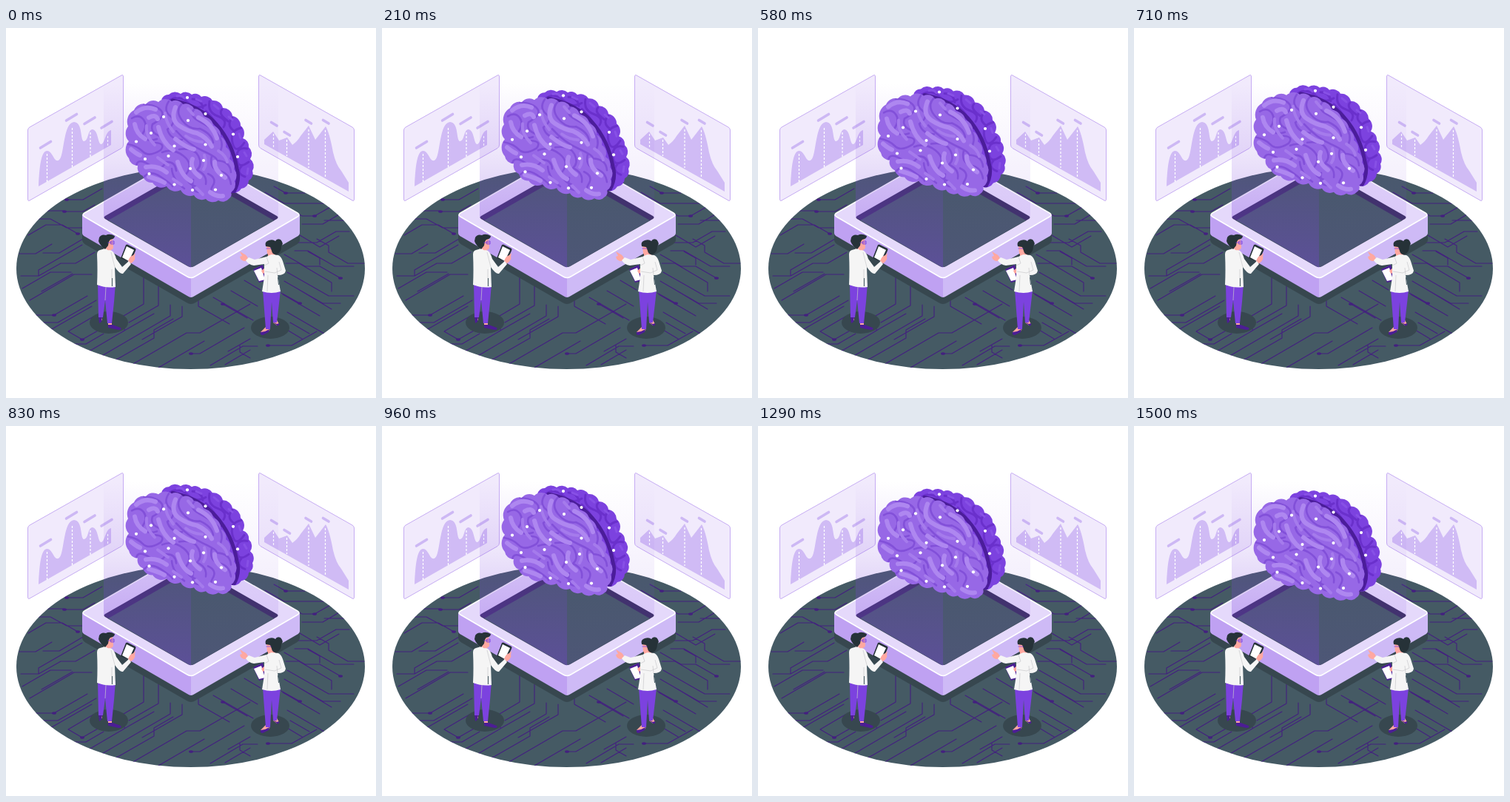
Animation, 500 px wide and 500 px high, one loop 1540 ms. Source, as an HTML page:

```html
<!DOCTYPE html>
<html lang="en">
<head>
<meta charset="utf-8">
<style>
  html, body { margin: 0; width: 100%; height: 100%; overflow: hidden; background: #fff; }
  svg { display: block; width: 100vw; height: 100vh; }
  .line { fill: none; stroke-linecap: round; stroke-linejoin: round; }
  .dash { fill: none; stroke: #fff; stroke-width: 1.2; stroke-dasharray: 3 2; }
  .tick { fill: none; stroke: #cdb8f4; stroke-width: 3.6; stroke-linecap: round; }
  .panel { fill: #f1eafc; stroke: #c6acf3; stroke-width: 1; }
  .chart { fill: #d0bbf5; }
  .skin { fill: #ffa8a0; }
  .hair { fill: #263238; }
  .coat { fill: #f5f5f5; }
  .trousers { fill: #7c42df; }
  .shoe { fill: #4c1d95; }
  .fold { fill: none; stroke: #c9c9cc; stroke-width: .7; }
</style>
</head>
<body>
<svg viewBox="0 0 500 500">
  <defs>
    <linearGradient id="beamLeft" x1="0" x2="0" y1="75" y2="324" gradientUnits="userSpaceOnUse">
      <stop offset="0" stop-color="#7c42df" stop-opacity="0"/>
      <stop offset=".35" stop-color="#7c42df" stop-opacity=".12"/>
      <stop offset="1" stop-color="#7c42df" stop-opacity=".42"/>
    </linearGradient>
    <linearGradient id="beamRight" x1="0" x2="0" y1="75" y2="324" gradientUnits="userSpaceOnUse">
      <stop offset="0" stop-color="#7c42df" stop-opacity="0"/>
      <stop offset="1" stop-color="#7c42df" stop-opacity=".15"/>
    </linearGradient>
    <clipPath id="floorClip"><ellipse cx="249.5" cy="325" rx="235.5" ry="136"/></clipPath>
    <clipPath id="wellClip"><path id="well" d="M134 254L246 190Q250 188 254 190L366 254Q369 256 366 258L254 322Q250 324 246 322L134 258Q131 256 134 254"/></clipPath>
    <clipPath id="frontClip"><path id="frontShape"/></clipPath>
    <clipPath id="backClip"><path id="backShape"/></clipPath>
  </defs>

  <ellipse cx="249.5" cy="325" rx="235.5" ry="136" fill="#455a64"/>
  <g clip-path="url(#floorClip)">
    <path class="line" stroke="#43207f" stroke-width="1.1" d="
      M82 232H104L130 217 M79 248H104L120 239 M50 247H78 M97 278L76 266H54L30 280
      M103 270H82L60 258H40 M104 285L72 304H50 M103 293L44 327V334 M18 305H40L62 292
      M20 335H44L74 318H94L120 303 M22 352L60 330H88 M32 368L92 333H116 M48 356L90 332
      M65 388H34 M65 388L110 362 M44 398H70L122 368 M60 408L116 376 M103 421L84 410L118 390
      M103 421L126 408 M84 427H108L132 413 M112 437L160 409V400 M128 444L222 389V374
      M146 450L200 419V408L226 393 M154 392L186 373V330 M166 398L206 375V346 M158 410L200 386
      M170 455L244 412H262L330 373 M206 459L268 423 M250 440H262L322 405 M260 362V376L302 400
      M293 373L326 392 M238 376V390L184 421 M276 456L320 430H340 M280 364L334 395 M304 355L340 376
      M300 437L330 420 M296 455L330 435 M354 429H386L420 410 M330 446L316 438V428
      M397 372L372 358 M322 341L344 354 M376 342L428 372H452 M390 350L440 380 M374 360L424 389
      M380 384L430 413 M384 398L410 413 M380 408L400 420 M452 338L424 322H404L376 306
      M484 318H462L436 303V294L420 285 M380 290H420L446 275H464 M397 280L424 296L450 281
      M390 301H408L444 322H470 M378 318H396L440 344V356 M380 330L436 362H470
      M417 254H400L388 247 M417 254L440 241 M430 260H474 M400 265H428L450 252
      M378 223L362 214 M378 223H404 M350 222L376 237H430 M370 250L350 238 M408 302L424 311V320"/>
    <g id="nodes" fill="#43207f"></g>
  </g>

  <!-- platform -->
  <path fill="#37474f" d="M103 262L250 180L397 262V286Q397 290 392 293L256 371Q250 375 244 371L108 293Q103 290 103 286Z"/>
  <path fill="#bfa1f2" d="M103 252V277Q103 280 107 282L245 362Q248 364 250 364V334Z"/>
  <path fill="#cebaf6" d="M397 252V277Q397 280 393 282L255 362Q252 364 250 364V334Z"/>
  <path fill="#e5d9fb" stroke="#fff" stroke-width="1.5" d="M106 250L245 170Q250 167 255 170L394 250Q398 252.500 394 255L255 336Q250 339 245 336L106 255Q102 252.500 106 250Z"/>
  <use href="#well" fill="#3b3062"/>
  <g clip-path="url(#wellClip)"><path fill="#455a64" d="M126 267L250 196L374 267L250 338Z"/></g>

  <!-- left panel -->
  <path class="panel" d="M32 134L156 64Q158.500 62.500 158.500 66V158Q158.500 161 156 162.500L32 233Q29.500 234.500 29.500 231V138Q29.500 135.500 32 134"/>
  <path class="chart" d="M44 214C45 190 47 167 55 166S65 184 72 178S77 128 92 127C104 128 100 151 105 153C112 153 110 137 117 137C125 138 124 158 129 157C134 155 134 140 142 138V158Z"/>
  <path class="dash" d="M55.500 170V208M89.500 135V189M114 141V174M137.500 146V161"/>
  <path class="tick" d="M46.500 162L60.500 153.500M81.500 125L95.500 116.500M106 129.500L120 121M129 135L143 126.500"/>

  <!-- right panel -->
  <path class="panel" d="M344 64L468 134Q470.500 135.500 470.500 138V231Q470.500 234.500 468 233L344 162.500Q341.500 161 341.500 158V66Q341.500 62.500 344 64"/>
  <path class="chart" d="M349 151L361 140L369 152L380 148L387 158Q394 153 398 146L409 132L418 151L432 133Q437 141 442 168Q446 185 453 193L463 209V221L349 157Z"/>
  <path class="dash" d="M361.500 143V163M379.500 151V173M409 137V189M431.500 138V201"/>
  <path class="tick" d="M358.500 127.500L366 132M376 140.500L383.500 145M405 124.500L412.500 129M428.500 124.500L436 129"/>

  <path fill="url(#beamLeft)" d="M132 75H250V324L132 256Z"/>
  <path fill="url(#beamRight)" d="M250 75H368V256L250 324Z"/>

  <!-- brain -->
  <g id="brain">
    <use href="#backShape" fill="#7c42df"/>
    <g clip-path="url(#backClip)" class="line">
      <path stroke="#6a30cc" stroke-width="3" d="M222 97Q234 90 246 101T270 104M252 96Q264 96 266 108M275 99Q272 114 286 119T294 134M292 110Q286 116 300 126M306 121Q297 131 308 139M318 135Q302 138 306 155T322 155M326 163Q311 160 312 176T328 181M318 187Q310 196 323 201M306 171Q320 190 310 207M270 112Q285 126 291 143"/>
      <path stroke="#8750e6" stroke-width="3" d="M231 92Q238 90 241 95M257 96L264 99M281 104L287 109M301 120L306 124M315 143L317 149M322 168L325 173M327 190L326 197"/>
      <path stroke="#4b1d9a" stroke-width="5" d="M225 98Q262 105 284 130T312 190Q317 206 307 223"/>
    </g>
    <use href="#frontShape" fill="#9768e6"/>
    <g clip-path="url(#frontClip)" class="line">
      <path stroke="#8250d9" stroke-width="2.600" d="
        M170 122Q180 116 186 124T184 144Q190 155 204 150M186 103Q204 104 210 112T198 130Q194 141 208 146
        M220 99Q212 111 222 119T218 137Q222 151 238 151M238 102Q228 112 238 125T262 136Q278 143 280 155
        M255 109Q246 118 261 126T285 142Q295 153 290 166M165 157Q177 159 185 167T209 165Q216 156 202 155
        M176 186Q178 175 194 185T216 181Q229 180 230 193M185 203Q194 191 209 201T225 214
        M211 168Q226 162 240 173T243 198Q244 210 256 214M234 164Q254 161 260 173T258 192Q272 198 270 211
        M230 139Q246 157 266 166T285 179Q303 180 304 195M278 173Q274 190 288 193T304 211
        M273 197Q286 203 279 214T294 229M224 190Q225 205 241 217M253 205Q249 223 264 222"/>
      <path stroke="#ae87f0" stroke-width="6" d="
        M176 114Q188 104 202 110M174 130Q176 143 188 150M193 121Q202 116 205 123
        M229 107Q222 124 234 132T258 142Q272 148 278 160M229 150Q244 162 254 164
        M206 134Q211 155 226 165M189 188Q204 185 217 195M169 164Q176 170 181 172
        M232 181Q238 201 250 207M252 177Q247 190 262 201M193 201Q207 205 214 209
        M260 121Q279 130 285 149M282 181Q281 192 296 202M276 222Q284 228 293 227"/>
      <path stroke="#a57bec" stroke-width="4" d="M190 132Q188 145 201 158M215 115Q216 128 226 140M246 109L253 117M205 175L219 185M243 146Q252 153 265 154M268 172Q272 184 267 191M226 204L237 212M287 166Q297 172 299 181M257 216L266 225"/>
    </g>
    <g id="dots" fill="#fff"></g>
  </g>

  <!-- man -->
  <ellipse cx="139" cy="398" rx="26" ry="15" fill="#37474f"/>
  <path class="skin" d="M126 388H130L130 395H126ZM138 396H143V402H138Z"/>
  <path class="shoe" d="M125 391L130 391L129 397L126 399ZM138 401L144 401L155 405Q157 408 152 408L138 405Z"/>
  <path class="trousers" d="M124 345H148L146 370L143 399H137L134 368L131 391H125Z"/>
  <path class="fold" stroke="#5b28b4" d="M135 350L134 368"/>
  <path class="hair" d="M164 292.500L175 298Q176 299 175 301L168 317L155 311L162 293Z"/>
  <path fill="#fff" d="M163 295L173 300L166 315L157 310Z"/>
  <path class="skin" d="M165 316Q166 309 172 307L175 304L174 309Q176 313 169 318ZM132 294H142V302L133 304Z"/>
  <path class="coat" d="M127 300L134 298L143 301Q147 304 149 312L157 323L166 315L169 319L158 332Q154 333 147 323L148 350Q136 352 123 347Q124 328 123 306Q123 301 127 300"/>
  <path class="fold" d="M142 303L147 323M143 326V349"/>
  <path stroke="#455a64" stroke-width="1" d="M143.500 338V349"/>
  <path class="skin" d="M133 286L144 285L145 297Q143 301 137 300L132 294Z"/>
  <path class="hair" d="M126 283Q129 278 135 280Q140 277 147 281Q147 285 141 286Q139 287 138 294L134 299Q127 294 125 288Z"/>
  <path class="line" stroke="#7c42df" stroke-width=".9" d="M138 290H145M142 288H146V292H142Z"/>

  <!-- woman -->
  <ellipse cx="357" cy="405" rx="26" ry="15" fill="#37474f"/>
  <path class="skin" d="M352 403H357L356 409L346 413L344 411ZM361 393H365L369 400L366 402L361 398Z"/>
  <path class="shoe" d="M344 411L350 410L356 407L355 411L347 415Q343 415 344 411ZM361 397L366 400L369 399Q370 403 366 402Z"/>
  <path class="trousers" d="M347 354H371L369 372L366 398H361L359 370L357 407H351Z"/>
  <path fill="#4c1d95" d="M334 326L347 320L352 341L342 344Z"/>
  <path fill="#fff" d="M335 328L345 324L350 340L342 342Z"/>
  <path class="skin" d="M316 302L321 305Q326 307 327 312L324 315Q317 315 316 309L319 308ZM345 328L350 324L352 330L347 332ZM354 300H364V309H354Z"/>
  <path class="coat" d="M352 309L358 306L368 307Q372 309 374 315L378 328Q377 334 367 334L371 356Q359 360 346 356L349 337V319L335 321Q328 320 324 314L328 310L336 313Z"/>
  <path class="fold" d="M352 309L355 318L349 321M369 316L372 327L363 331L350 329M367 334L366 324M354 334L353 356"/>
  <path stroke="#455a64" stroke-width="1" d="M367.500 337L368.500 347"/>
  <path class="skin" d="M352 294H363V302Q358 309 353 305Z"/>
  <path class="hair" d="M351 295Q349 289 355 287Q361 285 364 288Q366 284 371 286Q376 291 372 295Q372 303 366 306Q360 307 359 301L357 296Z"/>
  <path class="line" stroke="#7c42df" stroke-width=".8" d="M352 298H358"/>
</svg>
<script>
  const byId = id => document.getElementById(id);

  const ellipses = (points, rx, ry) => points.map(([x, y]) =>
    `<ellipse cx="${x}" cy="${y}" rx="${rx}" ry="${ry}"/>`).join('');

  // Closed outline whose consecutive points are joined by outward bulges.
  const scallop = points => points.map(([x, y], i) => {
    const [nx, ny] = points[(i + 1) % points.length];
    const r = Math.hypot(nx - x, ny - y) * 0.75;
    return `${i ? '' : `M${x} ${y}`}A${r} ${r} 0 0 1 ${nx} ${ny}`;
  }).join('') + 'Z';

  byId('backShape').setAttribute('d', scallop([
    [210, 98], [220, 90], [236, 89], [251, 90], [264, 93], [279, 98], [293, 108], [306, 119],
    [317, 132], [320, 149], [328, 161], [330, 177], [333, 193], [328, 206], [318, 217], [303, 222], [240, 160]
  ]));
  byId('frontShape').setAttribute('d', scallop([
    [166, 153], [165, 133], [173, 111], [189, 103], [206, 100], [224, 99], [239, 103], [254, 109],
    [267, 120], [280, 132], [290, 147], [297, 161], [302, 177], [308, 191], [309, 207], [304, 222],
    [301, 231], [287, 233], [270, 231], [254, 226], [236, 219], [217, 214], [198, 209], [185, 200],
    [178, 186], [166, 176]
  ]));
  byId('dots').innerHTML = ellipses([
    [245, 94], [269.5, 116], [213, 120], [246, 125], [196, 142], [176, 153.5], [227.5, 159.5],
    [269.5, 157.5], [307, 143.5], [313, 174], [188, 177], [219.5, 173], [267, 179], [249, 190],
    [193.5, 197], [291, 199], [227.5, 211.5], [252, 219], [283, 218.5]
  ], 2.1, 2.1);
  byId('nodes').innerHTML = ellipses([
    [82, 232], [79, 248], [97, 278], [65, 388], [103, 421], [250, 440], [293, 373],
    [354, 429], [397, 372], [452, 338], [417, 254], [378, 223]
  ], 3, 1.8);

  const LOOP = 1540, RISE = 10, LEAD = 60;
  const brain = byId('brain');

  function draw(now) {
    const phase = ((now + LEAD) % LOOP) / LOOP;
    const height = RISE * (1 - Math.abs(1 - 2 * phase));
    brain.setAttribute('transform', `translate(0 ${0.8 - height})`);
    requestAnimationFrame(draw);
  }
  draw(performance.now());
</script>
</body>
</html>
```
